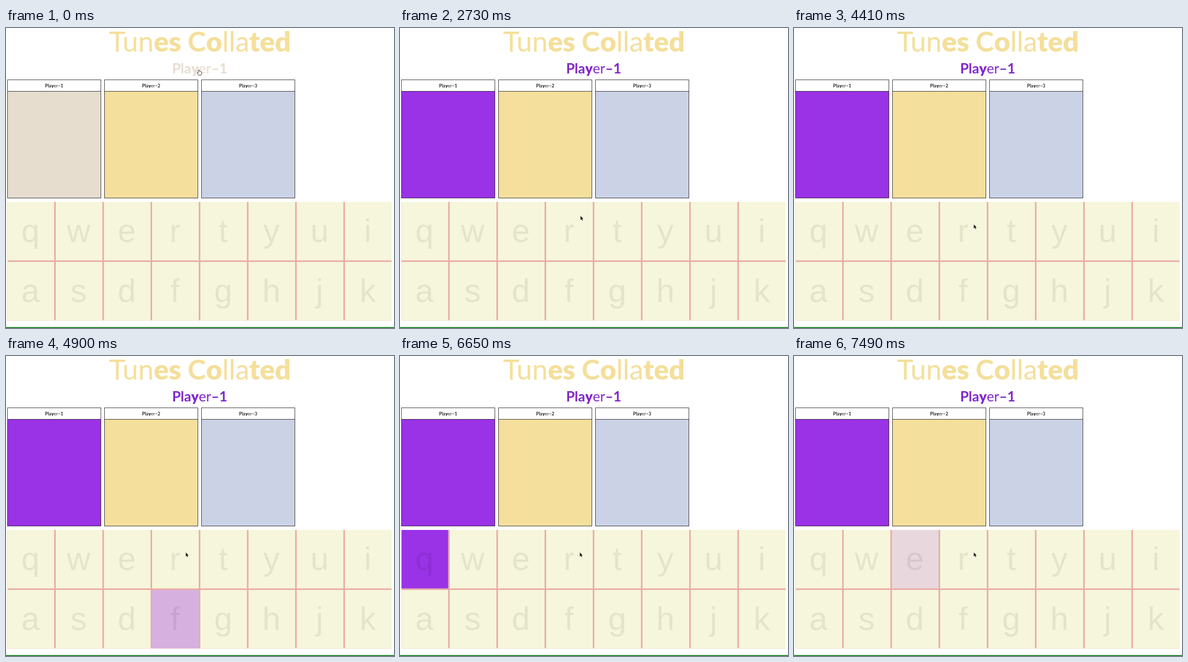
Animation, 640 px wide and 495 px high, one loop 7.56 s. Source, as an HTML page:

```html
<!DOCTYPE html>
<html lang="en">
<head>
<meta charset="utf-8">
<title>Tunes Collated</title>
<style>
  html, body { margin: 0; width: 100%; height: 100%; overflow: hidden; background: #fff; }
  svg { display: block; width: 100%; height: 100%; }
  text { text-anchor: middle; font-family: Lato, "Open Sans", sans-serif; }
  .key { font: 54px "Liberation Sans", Arial, sans-serif; fill: rgba(0, 0, 0, .07); }
</style>
</head>
<body>
<svg id="stage" viewBox="0 0 640 495"></svg>
<script>
const LOOP = 7560, STEP = 70;
const PURPLE = '#9a32e6', TAN = '#e6ddcf';
const stage = document.getElementById('stage');

function add(parent, tag, attrs, text) {
  const node = document.createElementNS('http://www.w3.org/2000/svg', tag);
  for (const name in attrs) node.setAttribute(name, attrs[name]);
  if (text) node.textContent = text;
  parent.append(node);
  return node;
}
const rect = (x, y, width, height, fill, more) =>
  add(stage, 'rect', { x, y, width, height, fill, ...more });

// Lettering with a different weight for each run of letters
function mixedText(x, y, size, fill, runs) {
  const node = add(stage, 'text', { x, y, 'font-size': size, fill });
  for (const [letters, weight] of runs) add(node, 'tspan', { 'font-weight': weight }, letters);
  return node;
}
const playerRuns = n => [['Pla', 700], ['y', 900], ['er', 400], ['–', 700], [String(n), 700]];

rect(0, 0, 640, 495, '#fff');
mixedText(320, 39, 46, '#f4df9b',
  [['Tun', 400], ['es ', 900], ['C', 700], ['o', 900], ['lla', 400], ['ted', 900]]);
const subtitle = mixedText(319.5, 74.5, 23, TAN, playerRuns(1));

const panels = [TAN, '#f5df9d', '#ccd2e6'].map((color, i) => {
  const x = 2.5 + 160 * i, line = { stroke: 'rgba(0, 0, 0, .65)', 'stroke-width': 1 };
  const body = rect(x, 104.5, 154, 176, color);
  rect(x, 85.5, 154, 195, 'none', line);
  rect(x, 104, 154, 1, 'rgba(0, 0, 0, .65)');
  mixedText(x + 77, 98, 7.5, '#222', playerRuns(i + 1));
  return body;
});

// Pink shows through the gaps between the keys
rect(2.5, 287, 633.5, 195.5, '#e9aba4');
const glow = {};
['qwertyui', 'asdfghjk'].forEach((row, r) => [...row].forEach((key, c) => {
  const x = 2.5 + 79.5 * c, y = r ? 386 : 287, w = 77, h = 96.5;
  rect(x, y, w, h, '#f6f6dc');
  glow[key] = rect(x, y, w, h, PURPLE, { opacity: 0 });
  add(stage, 'text', { class: 'key', x: x + 37.8, y: r ? 451.7 : 352.7 }, key);
}));
rect(0, 493.5, 640, 1.5, '#0f7a1c');

const hand = add(stage, 'path', {
  d: 'M-1.5 0v4.5l-1.5-1v1.5l2.2 3.5h4l1-3V2.7l-1.4-.4-1.4-.4-1.4-.3V0z',
  fill: '#fff', stroke: '#333', 'stroke-width': .8
});
const arrow = add(stage, 'path', {
  d: 'M0 0v7l1.6-1.4 1.1 2.5 1.2-.5-1.1-2.4H5z',
  fill: '#000', stroke: '#fff', 'stroke-width': .3
});

// [key, pressed at, fade time]
const presses = [
  ['a', 3920, 280], ['f', 4620, 430], ['e', 5390, 410],
  ['w', 5440, 360], ['q', 6650, 280], ['e', 7280, 247]
];
const clamp = v => Math.max(0, Math.min(1, v));

function draw(time) {
  const t = Math.floor(time % LOOP / STEP) * STEP;

  const chosen = t >= 140;
  panels[0].setAttribute('fill', chosen ? PURPLE : TAN);
  subtitle.setAttribute('fill', chosen ? '#8026cf' : TAN);

  for (const key in glow) {
    const levels = presses.filter(p => p[0] === key && t >= p[1])
      .map(([, start, fade]) => clamp(1 - (t - start) / fade));
    glow[key].setAttribute('opacity', Math.max(0, ...levels));
  }

  const p = clamp((t - 2310) / 490), move = p * p * (3 - 2 * p);
  const x = 318.5 - 22 * move, y = 69.5 + 254.5 * move;
  const overName = y < 78;
  for (const [cursor, shown] of [[hand, overName], [arrow, !overName]]) {
    cursor.setAttribute('transform', `translate(${x} ${y})`);
    cursor.setAttribute('visibility', shown ? 'visible' : 'hidden');
  }
}

const begin = performance.now();
function frame() {
  draw(performance.now() - begin);
  requestAnimationFrame(frame);
}
frame();
</script>
</body>
</html>
```
